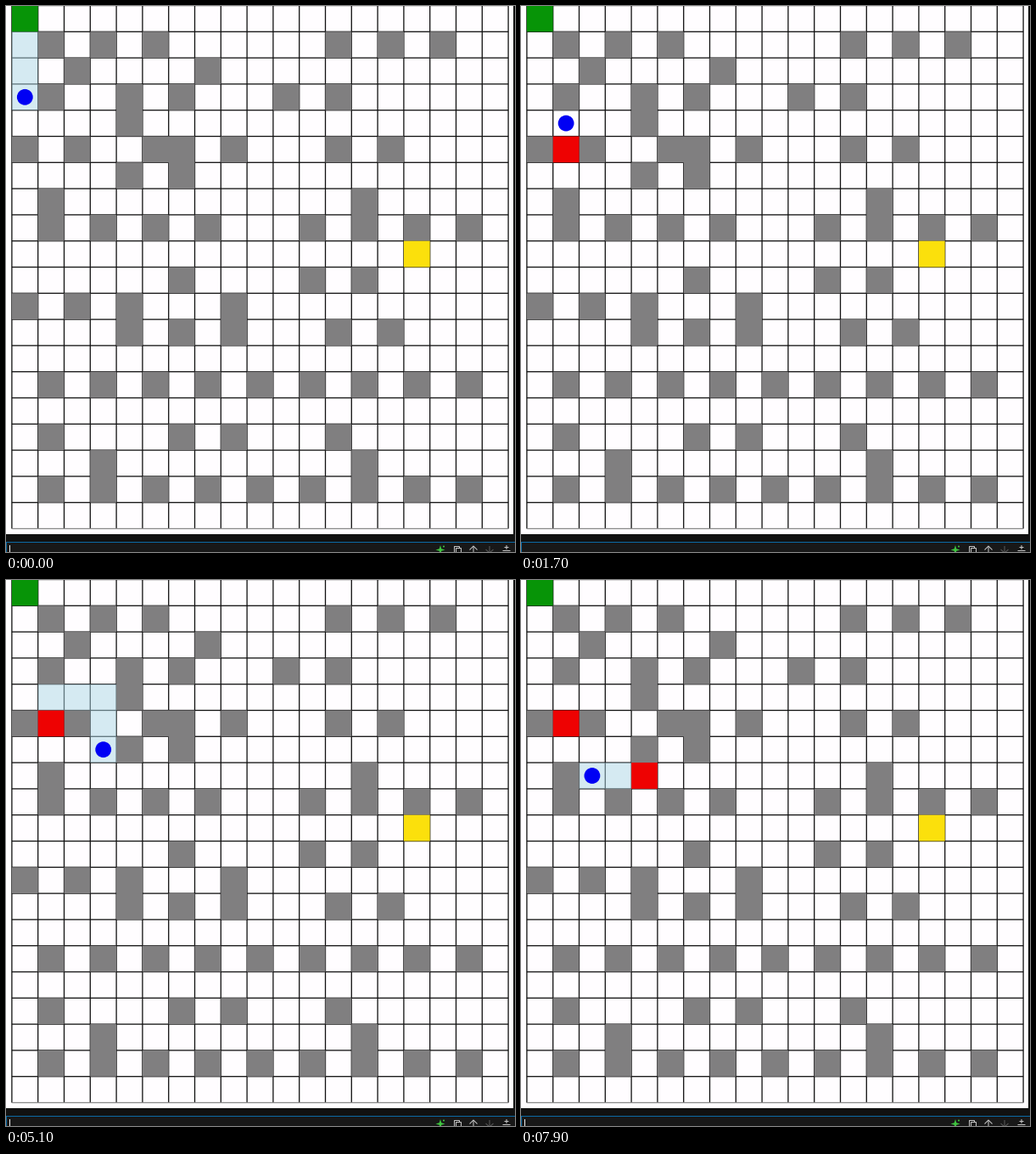
Animation, 600 px wide and 643 px high, one loop 8000 ms. Source, as a matplotlib script:

```python
import matplotlib.pyplot as plt
import numpy as np
from matplotlib.animation import FuncAnimation
from matplotlib.patches import Circle, PathPatch, Polygon, Rectangle
from matplotlib.path import Path

WIDTH, HEIGHT, DPI = 600, 643, 100
FRAME_MS, LOOP_MS = 100, 8000
COLS, ROWS, CELL = 19, 20, 30.8
LEFT, TOP, SCROLL = 6.9, -0.5, 11
PX = 72 / DPI

# Timing in ms: one step, pause before a message, its stay, replanning.
STEP, NOTICE, STAY, REPLAN = 570, 130, 100, 1690
FIRST_START = -1680
BLINK = 1200

START, GOAL = (0, 0), (9, 15)
# Corners of each planned walk and the cell found blocked at its end.
PLANS = [
    ([(1, 0), (4, 0), (4, 1)], (5, 1)),
    ([(4, 1), (4, 3), (7, 3)], (7, 4)),
    ([(7, 3), (7, 2)], None),
]

fig = plt.figure(figsize=(WIDTH / DPI, HEIGHT / DPI), dpi=DPI)
ax = fig.add_axes([0, 0, 1, 1])


def build_walls():
    """Mostly every second cell of a row, plus short columns and singles."""
    walls = np.zeros((ROWS, COLS), bool)
    walls[[8, 14, 18], 1:18:2] = True
    walls[GOAL] = walls[8, 9] = False
    walls[1, 1:6:2] = walls[1, 12:17:2] = True
    walls[[5, 11], 0:3:2] = True
    walls[[3, 6, 12], 4:7:2] = True
    walls[[5, 12, 16], 6:9:2] = True
    walls[[5, 12], 12:15:2] = True
    walls[3, 10:13:2] = walls[10, 11:14:2] = True
    walls[3:5, 4] = walls[11:13, [4, 8]] = True
    walls[7:9, [1, 13]] = walls[17:19, [3, 13]] = True
    for cell in [(2, 2), (2, 7), (3, 1), (5, 5), (10, 6), (16, 1), (16, 12)]:
        walls[cell] = True
    return list(zip(*np.nonzero(walls)))


def walk(corners):
    """All cells along a path given by its corners."""
    cells = [corners[0]]
    for goal in corners[1:]:
        while cells[-1] != goal:
            cells.append(tuple(int(a + np.sign(b - a))
                               for a, b in zip(cells[-1], goal)))
    return cells


def build_legs():
    """Start time, cells, message time and blocked cell of each walk."""
    legs, start = [], FIRST_START
    for corners, blocked in PLANS:
        cells = walk(corners)
        notice = start + STEP * (len(cells) - 1) + NOTICE
        legs.append((start, cells, notice, blocked))
        start = notice + STAY + REPLAN
    return legs


WALLS, LEGS = build_walls(), build_legs()


def box(x0, y0, x1, y1, color, **style):
    ax.add_patch(Rectangle((x0, y0), x1 - x0, y1 - y0,
                           fc=color, lw=0, **style))


def stroke(xs, ys, color, width=1.0):
    ax.plot(xs, ys, color=color, lw=width * PX, snap=False,
            solid_capstyle="butt")


def cell_xy(row, col, shift):
    return LEFT + CELL * col, TOP + CELL * row - shift


def fill_cells(cells, color, shift, alpha=1):
    """Fill cells as one shape, so that neighbours join without a seam."""
    squares = []
    for row, col in cells:
        x, y = cell_xy(row, col, shift)
        corners = [(x, y), (x + CELL, y), (x + CELL, y + CELL), (x, y + CELL)]
        squares.append(Path(corners + corners[:1], closed=True))
    if squares:
        ax.add_patch(PathPatch(Path.make_compound_path(*squares), fc=color,
                               lw=0, alpha=alpha, snap=False, zorder=3))


def draw_board(shift):
    right, bottom = cell_xy(ROWS, COLS, shift)[0], cell_xy(ROWS, 0, shift)[1]
    box(0, 0, 598, round(bottom + 7), "#fffdff")
    for col in range(COLS + 1):
        x, _ = cell_xy(0, col, shift)
        stroke([x, x], [0, bottom], "#101010", 1.3)
    for row in range(ROWS + 1):
        _, y = cell_xy(row, 0, shift)
        color = "#8a8a8a" if row == ROWS else "#101010"
        stroke([LEFT, right], [y, y], color, 1.3)
    fill_cells(WALLS, "#807f80", shift)
    fill_cells([START], "#079407", shift)
    fill_cells([GOAL], "#fbe00c", shift)


def draw_toolbar():
    box(0, 631, WIDTH, HEIGHT, "#0b6aa5")
    box(1, 632, WIDTH, HEIGHT, "#181818")
    angles = np.arange(8) * np.pi / 4
    radii = np.where(np.arange(8) % 2, 1.8, 5.5)
    ax.add_patch(Polygon(np.c_[512 + radii * np.cos(angles),
                               640.5 + radii * np.sin(angles)],
                         fc="#3fc43f", lw=0))
    ax.add_patch(Circle((516, 636.5), 1, fc="#3fc43f", lw=0))
    light, dim = "#c8c8c8", "#5a5a5a"
    for offset in (0, 2):
        ax.add_patch(Rectangle((528.5 + offset, 636.5 + offset), 6, 8,
                               fc="#181818", ec=light, lw=PX, snap=False,
                               zorder=3))
    for x, tip, wing, color in ((551, 636, 640.5, light), (570, 644, 640, dim)):
        stroke([x, x], [636, HEIGHT], color)
        stroke([x - 4.5, x, x + 4.5], [wing, tip, wing], color)
    stroke([585.5, 594.5], [641.5, 641.5], light)
    stroke([590, 590], [635, 640], light)
    stroke([587.5, 592.5], [637.5, 637.5], light)


def draw(index):
    now = index * FRAME_MS
    ax.clear()
    ax.set(xlim=(0, WIDTH), ylim=(HEIGHT, 0))
    ax.axis("off")
    box(0, 0, WIDTH, HEIGHT, "#111111")

    trail, found, message = [], [], None
    for number, (start, cells, notice, blocked) in enumerate(LEGS, 1):
        if now < start:
            break
        trail = cells[:int((now - start) // STEP) + 1]
        ball = trail[-1]
        if blocked and notice <= now < notice + STAY:
            message = (f"Obstáculo añadido en la posición {blocked} "
                       f"en el paso {6 * number}")
        elif blocked and now >= notice:
            found.append(blocked)
            trail = []

    shift = SCROLL if message else 0
    draw_board(shift)
    fill_cells(found, "#ee0202", shift)
    fill_cells(trail, "lightblue", shift, alpha=0.5)
    x, y = cell_xy(ball[0] + 0.5, ball[1] + 0.5, shift)
    ax.add_patch(Circle((x, y), 9.4, fc="#0000f4", lw=0, zorder=4))

    if message:
        ax.text(4, 621.5, message, color="#f0f0f0", weight="bold",
                family="DejaVu Sans Mono", size=7.35 * PX, va="baseline")
    draw_toolbar()
    if now // BLINK % 2 == 0:
        box(4, 635, 5, HEIGHT, "#f0f0f0", zorder=4)
    return []


anim = FuncAnimation(fig, draw, frames=LOOP_MS // FRAME_MS, interval=FRAME_MS,
                     init_func=lambda: [], repeat=True, repeat_delay=0)
plt.show()
```
